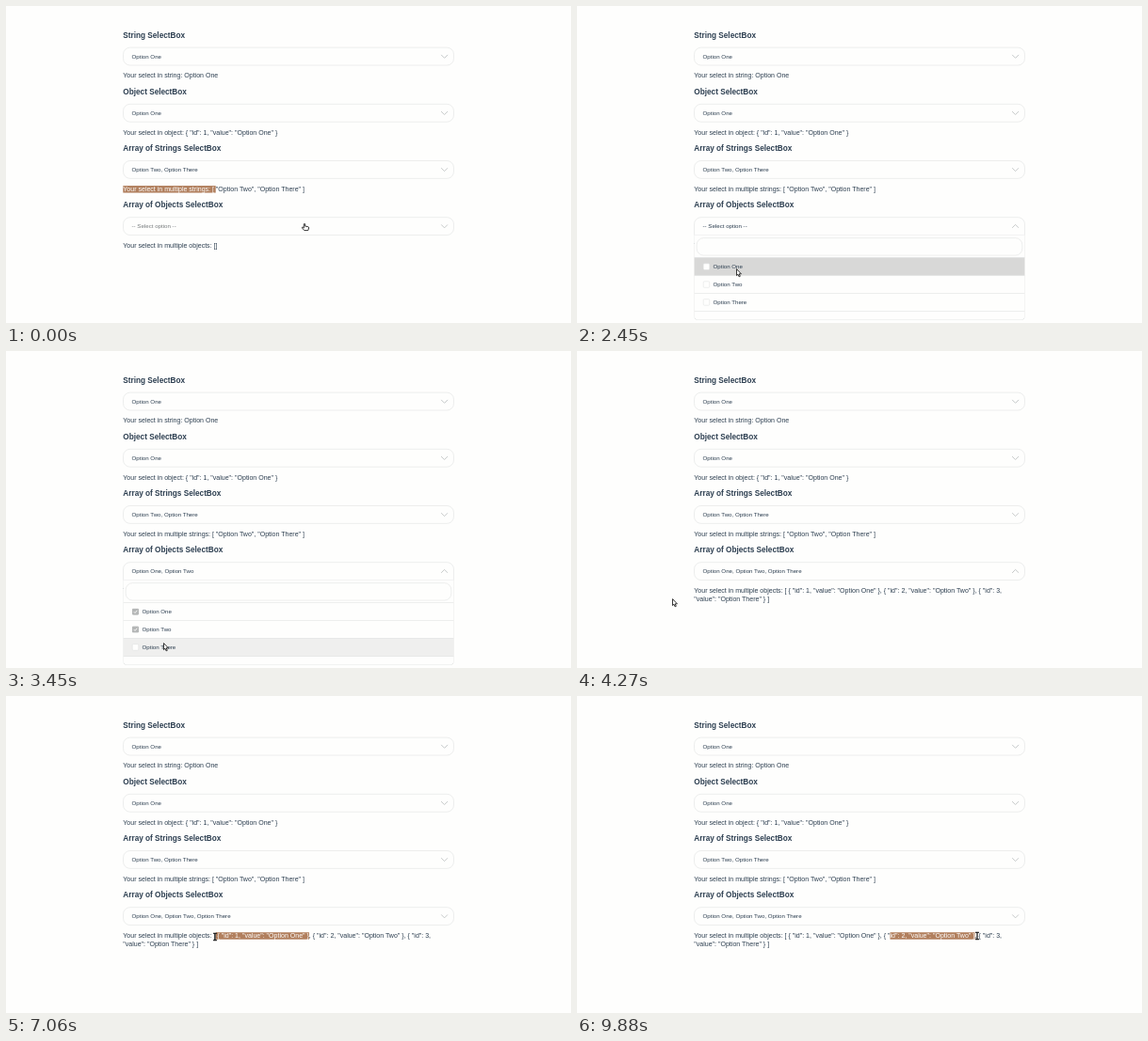
An HTML page that plays this animation: 600 by 337 pixels, repeating every 10000 ms.

```html
<!DOCTYPE html>
<html lang="en">
<head>
<meta charset="utf-8">
<title>SelectBox demo</title>
<style>
  html, body { margin: 0; width: 100%; height: 100%; overflow: hidden; background: #fefefd; }
  #page {
    position: absolute; left: 0; top: 0; width: 1366px; height: 767px;
    transform: scale(.43924); transform-origin: 0 0;
    font: 16px/19px "Liberation Sans", Arial, sans-serif; color: #2c3e50;
  }
  #page * { box-sizing: border-box; }
  .field { position: absolute; left: 283px; width: 800px; height: 137px; }
  h3, p, .select { position: absolute; left: 0; width: 800px; margin: 0; white-space: pre; }
  h3 { top: 0; font-size: 18.72px; line-height: 22px; }
  p { top: 99.5px; }
  mark { background: #b17f5d; color: #fefefd; }
  .select {
    top: 40px; height: 44px; padding-left: 20px; line-height: 42px; font-size: 14px;
    border: 1px solid #d5d8d8; border-radius: 17px;
  }
  .select svg { position: absolute; right: 13px; top: 12px; width: 18px; height: 18px; }
  .select path { fill: none; stroke: #c4c7c8; stroke-width: 2.2; }
  #panel {
    position: absolute; left: 283px; top: 555px; width: 800px; height: 205px; font-size: 14px;
    background: #fefefd; border: 1px solid #d5d8d8; border-top: 0; border-radius: 0 0 9px 9px;
  }
  #search { height: 43px; margin: 6px 5px 5px; border: 1px solid #d5d8d8; border-radius: 17px; }
  .row {
    position: relative; height: 43px; padding-left: 45px; line-height: 42px;
    border-top: 1px solid #d5d8d8;
  }
  .row:last-child { height: 44px; border-bottom: 1px solid #d5d8d8; }
  .box {
    position: absolute; left: 21px; top: 13px; width: 16px; height: 16px;
    background: #fefefd; border: 1px solid #d9dbdb; border-radius: 3px;
  }
  .box svg { position: absolute; left: -1px; top: -1px; width: 16px; height: 16px; }
  #cursor { position: absolute; left: 0; top: 0; width: 600px; height: 337px; }
</style>
</head>
<body>
<div id="page"></div>
<svg id="cursor" viewBox="0 0 600 337">
  <g id="hand" fill="#fefefd" stroke="#222" stroke-width=".9" stroke-linejoin="round">
    <path d="M-1.7 1V-3.2Q-1-4.3-.3-3.2V-.9L2.8-.4Q3.7-.1 3.6 1L2.8 3.6H-1.2L-3.6.9Q-3.7-.3-2.6.2Z"/>
  </g>
  <g id="arrow" fill="#fefefd" stroke="#222" stroke-width=".9" stroke-linejoin="round">
    <path d="M.5.6V7.6L2 6.2 3.1 8.8 4.3 8.3 3.2 5.8H5.4Z"/>
  </g>
  <g id="beam" fill="none" stroke="#222" stroke-width="1.3">
    <path d="M-1.9-3.6H1.9M0-3.6V3.6M-1.9 3.6H1.9"/>
  </g>
</svg>
<script>
const LOOP = 10000;
const $ = id => document.getElementById(id);
const options = ['Option One', 'Option Two', 'Option There'];
const titles = ['String', 'Object', 'Array of Strings', 'Array of Objects'];
const values = ['Option One', 'Option One', 'Option Two, Option There', ''];
const stringsText = 'Your select in multiple strings: [ "Option Two", "Option There" ]';
const results = ['Your select in string: Option One',
  'Your select in object: { "id": 1, "value": "Option One" }', stringsText, ''];

$('page').innerHTML = titles.map((title, i) => `
  <div class="field" style="top:${59.5 + i * 137.3}px">
    <h3>${title} SelectBox</h3>
    <div class="select"><span>${values[i]}</span>
      <svg viewBox="0 0 18 18"><path d="M1 5L9 13L17 5"/></svg></div>
    <p>${results[i]}</p>
  </div>`).join('') + `
  <div id="panel"><div id="search"></div>${options.map(name => `
    <div class="row"><span class="box"><svg viewBox="0 0 16 16">
      <rect width="16" height="16" rx="3" fill="#b5b7b7"/>
      <path d="M4 8L7 11L12 5" fill="none" stroke="#fefefd" stroke-width="2"/>
    </svg></span>${name}</div>`).join('')}</div>`;

const paragraphs = document.querySelectorAll('p');
const select = document.querySelectorAll('.select')[3];
const label = select.querySelector('span');
const chevron = select.querySelector('svg');
const rows = [...document.querySelectorAll('.row')];
const checks = rows.map(row => row.querySelector('svg'));

const OPEN = 1550, CLOSE = 4270;
const checkTimes = [2550, 3210, 3730];

// time, x, y, shape
const cursorPath = [
  [0, 318, 235, 'hand'], [60, 318, 235, 'hand'], [500, 275, 228, 'hand'],
  [700, 254, 217, 'beam'], [790, 252, 214, 'beam'], [1060, 252, 214, 'beam'],
  [1150, 238, 228, 'hand'], [1390, 201, 238, 'hand'], [1610, 201, 238, 'hand'],
  [1750, 193, 247, 'beam'], [1950, 180, 267, 'arrow'], [2390, 169, 279, 'arrow'],
  [2490, 169, 279, 'arrow'], [2550, 169, 289, 'arrow'], [2790, 168, 297, 'arrow'],
  [3210, 168, 297, 'arrow'], [3390, 167, 310, 'arrow'], [3730, 167, 310, 'arrow'],
  [4060, 101, 263, 'arrow'], [4730, 101, 263, 'arrow'], [4910, 124, 258, 'beam'],
  [5390, 222, 256, 'beam'], [5670, 223, 256, 'beam'], [5790, 273, 257, 'beam'],
  [5880, 273, 257, 'beam'], [6100, 319, 257, 'beam'], [6250, 319, 257, 'beam'],
  [6670, 233, 264, 'beam'], [7060, 222, 256, 'beam'], [7450, 222, 256, 'beam'],
  [7700, 226, 262, 'beam'], [7940, 234, 267, 'arrow'], [8550, 234, 267, 'arrow'],
  [8700, 250, 264, 'beam'], [9450, 333, 256, 'beam'], [9610, 333, 256, 'beam'],
  [9880, 425, 255, 'beam'], [LOOP, 425, 255, 'beam']
];

// time, first character, end character
const selection = [
  [0, 34, 34], [5670, 34, 34], [5790, 34, 48], [5880, 34, 48], [6100, 34, 69],
  [7449, 34, 69], [7450, 34, 40], [7600, 34, 116], [7601, 34, 130], [7940, 34, 143],
  [8549, 34, 143], [8550, 74, 74], [9610, 74, 74], [9880, 74, 105], [LOOP, 74, 105]
];

// time, hovered row, shade
const hovers = [
  [0, -1, 0], [1950, 0, .06], [2330, 0, .15], [2550, 1, .06],
  [3210, 1, .15], [3270, 1, .06], [3390, 2, .06], [3670, 2, .15],
  [3730, 2, .06], [3850, -1, 0]
];

const clamp = v => Math.max(0, Math.min(1, v));
const current = (table, t) => table.findLast(step => step[0] <= t);

function between(table, t) {
  const i = table.indexOf(current(table, t));
  const a = table[i], b = table[i + 1] || a;
  const k = b === a ? 0 : (t - a[0]) / (b[0] - a[0]);
  return [1, 2].map(n => a[n] + (b[n] - a[n]) * k);
}

function objectsText(count) {
  const items = options.slice(0, count)
    .map((value, i) => `{ "id": ${i + 1},${i === 2 ? '\n' : ' '}"value": "${value}" }`);
  return 'Your select in multiple objects: ' + (count ? `[ ${items.join(', ')} ]` : '[]');
}

function showText(node, text, from, to) {
  const key = [text, from, to].join('|');
  if (node.shown === key) return;
  node.shown = key;
  const mark = document.createElement('mark');
  mark.textContent = text.slice(from, to);
  node.replaceChildren(text.slice(0, from), mark, text.slice(to));
}

function render(t) {
  const open = t >= OPEN && t < CLOSE;
  const count = checkTimes.filter(time => t >= time).length;

  $('panel').style.display = open ? '' : 'none';
  select.style.borderRadius = open ? '17px 17px 0 0' : '';
  const turn = clamp((t - OPEN - 60) / 240) - clamp((t - CLOSE) / 120);
  chevron.style.transform = `rotate(${turn * 180}deg)`;

  label.textContent = count ? options.slice(0, count).join(', ') : '-- Select option --';
  label.style.color = t < OPEN + 120 ? '#777b7d' : '';

  const [, hovered, shade] = current(hovers, t);
  rows.forEach((row, i) => {
    row.style.backgroundColor = `rgba(0,0,0,${i === hovered ? shade : 0})`;
    checks[i].style.opacity = clamp((t - checkTimes[i] + 60) / 120) * (t >= checkTimes[i]);
  });

  showText(paragraphs[2], stringsText, 0, t < 60 ? 35 : 0);
  showText(paragraphs[3], objectsText(count), ...between(selection, t).map(Math.round));

  const [x, y] = between(cursorPath, t);
  const shape = current(cursorPath, t)[3];
  for (const id of ['hand', 'arrow', 'beam']) {
    $(id).style.display = id === shape ? '' : 'none';
    $(id).setAttribute('transform', `translate(${x} ${y})`);
  }
}

function tick() {
  render(performance.now() % LOOP);
  requestAnimationFrame(tick);
}
tick();
</script>
</body>
</html>
```
